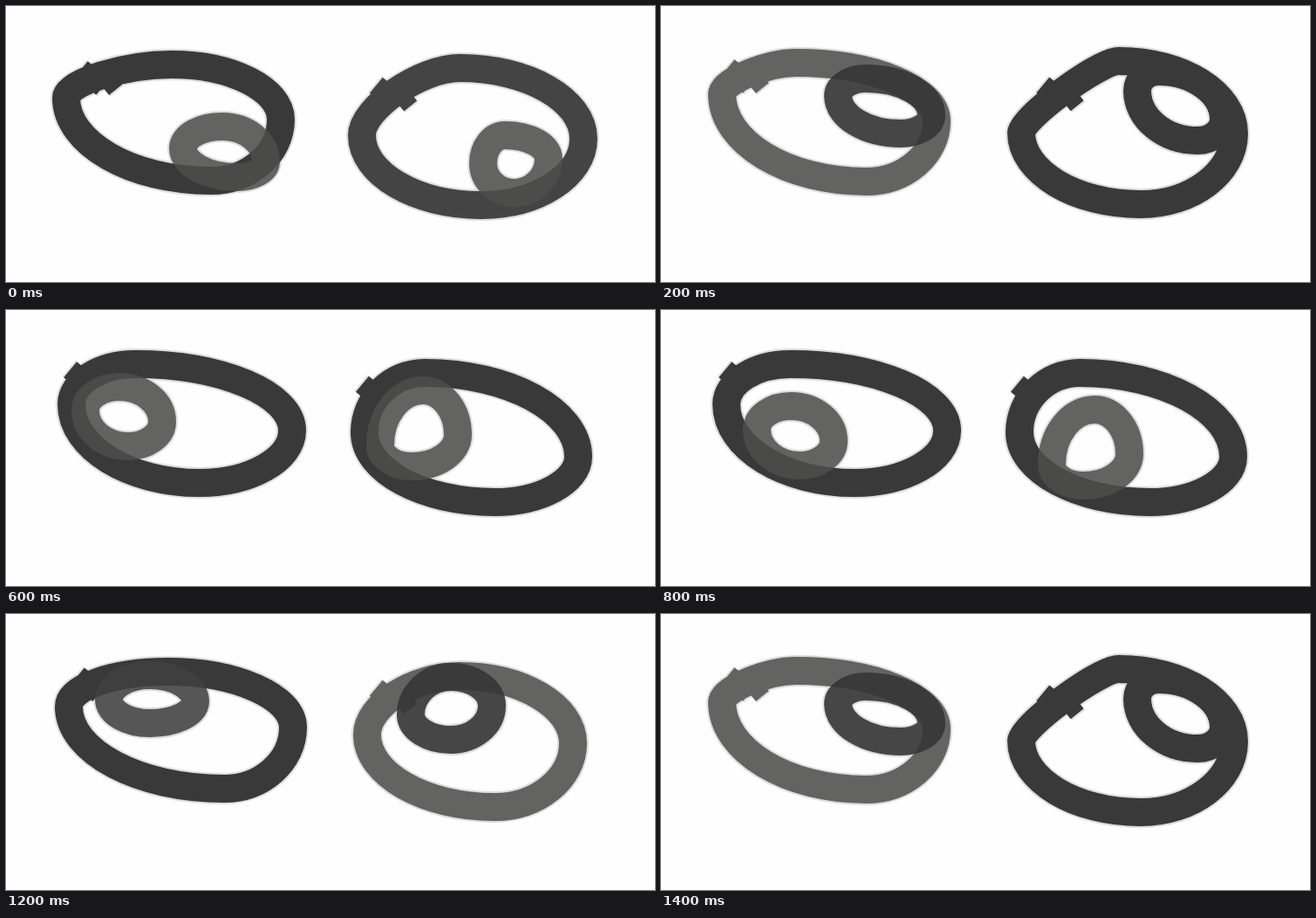
These frames come from a looping animation (744 by 316 pixels, 1600 ms). An HTML page with a canvas:

```html
<!DOCTYPE html>
<html lang="en">
<head>
<meta charset="utf-8">
<title>Rolling eyes</title>
<style>
  html, body { margin: 0; width: 100%; height: 100%; overflow: hidden; background: #fefefe; }
  canvas { display: block; }
</style>
</head>
<body>
<canvas id="stage" width="744" height="316"></canvas>
<script>
const ctx = document.getElementById('stage').getContext('2d');
const STEP = 200;
const ROUND = 0.55;
const WIDTH = 32;
const HALO = '#dedede';
const DARK = '#393939';
const SOFT = '#444';
const LIGHT = 'rgba(78,78,77,.85)';
const MID = 'rgba(65,65,65,.86)';
const DEEP = 'rgba(54,54,54,.9)';

// Closed loop touching its box at four points; k rounds the upper left quarter.
function loop(left, top, right, bottom, k = ROUND) {
  const path = new Path2D();
  const mix = (a, b, f) => a + (b - a) * f;
  const arc = (a, b, upright, f) => {
    const [cx, cy] = upright ? [a[0], b[1]] : [b[0], a[1]];
    path.bezierCurveTo(
      mix(a[0], cx, f), mix(a[1], cy, f),
      mix(b[0], cx, f), mix(b[1], cy, f), ...b);
  };
  path.moveTo(...left);
  arc(left, top, true, k);
  arc(top, right, false, ROUND);
  arc(right, bottom, true, ROUND);
  arc(bottom, left, false, ROUND);
  path.closePath();
  return path;
}

// A loop whose brush ends cross at the upper left; a flatter quarter shows its tail.
function rim(left, top, right, bottom, k = ROUND) {
  const path = loop(left, top, right, bottom, k);
  const f = (4 - 3 * k) / 8;
  const x = left[0] + f * (top[0] - left[0]);
  const y = top[1] + f * (left[1] - top[1]);
  path.moveTo(x - 18, y + 12);
  path.lineTo(x - 3, y - 6);
  if (k < ROUND) {
    path.moveTo(x + 14, y - 2);
    path.lineTo(x - 1, y + 10);
  }
  return path;
}

const lowRight = [
  [SOFT, rim([408,148], [520,71], [662,152], [545,228], 0.4)],
  [LIGHT, loop([547,180], [572,148], [622,175], [582,214])],
  [DARK, rim([69,105], [190,67], [315,130], [235,200], 0.45)],
  [LIGHT, loop([203,163], [248,138], [298,178], [265,196])]
];

const highRight = [
  [DARK, rim([413,145], [525,63], [657,146], [550,227], 0.2)],
  [DARK, loop([546,97], [570,75], [645,130], [615,154])],
  [LIGHT, rim([70,101], [155,65], [316,132], [235,201], 0.4)],
  [DEEP, loop([203,103], [235,83], [310,125], [275,146])]
];

const highLeft = [
  [LIGHT, rim([414,138], [520,71], [650,148], [560,221], 0.5)],
  [DEEP, loop([464,115], [510,72], [557,105], [510,144])],
  [DARK, rim([72,106], [185,66], [329,130], [250,200])],
  [MID, loop([118,98], [165,70], [217,100], [165,125])]
];

// Both eyes looking left, with the pupils moved by dx, dy.
function gazeLeft(dx, dy) {
  const pupil = (...points) => loop(...points.map(([x, y]) => [x + dx, y + dy]));
  return [
    [DARK, rim([411,140], [480,72], [656,168], [560,220])],
    [LIGHT, pupil([429,155], [478,92], [518,143], [465,179])],
    [DARK, rim([75,108], [148,62], [328,138], [222,198])],
    [LIGHT, pupil([91,115], [130,88], [179,128], [140,156])]
  ];
}

const left = gazeLeft(0, 0);
const order = [lowRight, highRight, highLeft, left, gazeLeft(19, 22), left, highLeft, highRight];

function ink(color, width, path) {
  ctx.strokeStyle = color;
  ctx.lineWidth = width;
  ctx.stroke(path);
}

function draw(pose) {
  ctx.fillStyle = '#fefefe';
  ctx.fillRect(0, 0, 744, 316);
  ctx.lineJoin = 'round';
  for (const [, path] of pose) ink(HALO, WIDTH + 4, path);
  for (const [color, path] of pose) ink(color, WIDTH, path);
}

const start = performance.now();
function tick() {
  const t = performance.now() - start;
  draw(order[Math.floor(t / STEP) % order.length]);
  requestAnimationFrame(tick);
}
tick();
</script>
</body>
</html>
```
